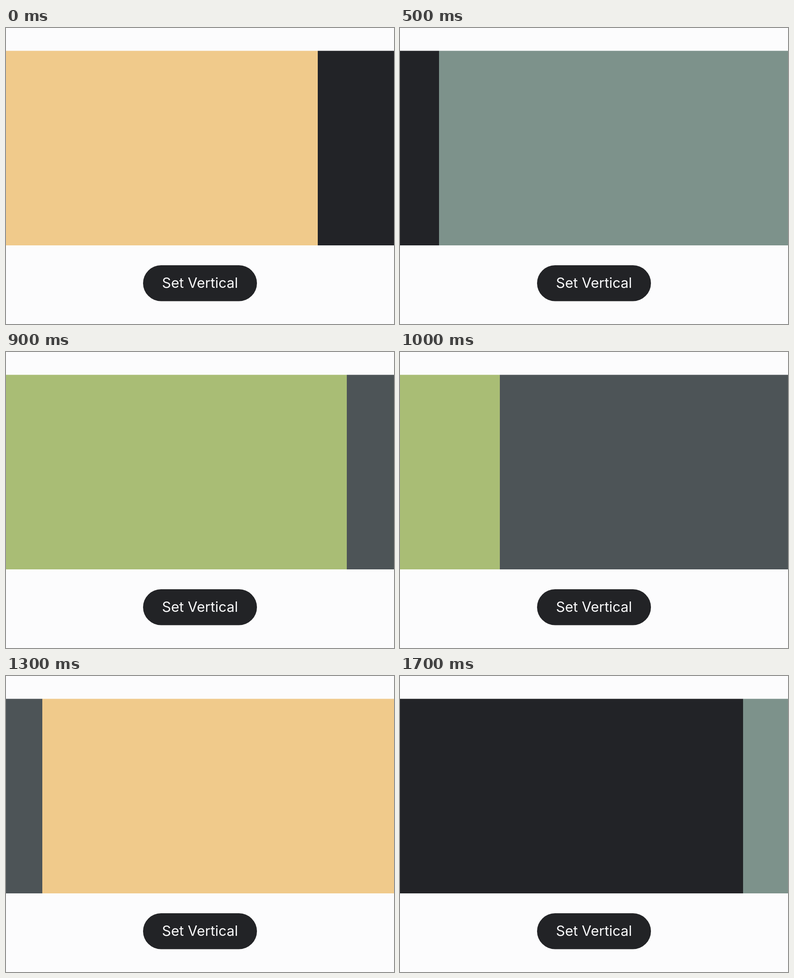
An HTML page for the animation above (1800 ms loop, 855 by 655 pixels).

```html
<!DOCTYPE html>
<html lang="en">
<head>
<meta charset="utf-8">
<title>Carousel</title>
<style>
  html, body { margin: 0; width: 100%; height: 100%; overflow: hidden; background: #fcfcfd; }
  svg { display: block; width: 855px; height: 655px; }
  text { font: 400 31px Inter, "Open Sans", sans-serif; fill: #fafafb; }
</style>
</head>
<body>
<svg viewBox="0 0 855 655">
  <rect width="855" height="655" fill="#fcfcfd"/>
  <g id="pages"></g>
  <rect x="302" y="525" width="251" height="79.5" rx="39.75" fill="#222326"/>
  <text x="427.5" y="575" text-anchor="middle">Set Vertical</text>
</svg>
<script>
const WIDTH = 855, LOOP = 1800, STEP = 100;
const colors = ['#f0ca8b', '#222327', '#7d928b', '#a9bd75', '#4d5457'];

// One swipe per page: start time and duration in ms
const swipes = [
  [-114.6, 392], [317.25, 230], [579.77, 230], [847.9, 230],
  [1115.6, 230], [1381.14, 230], [1649.16, 230]
];

const group = document.getElementById('pages');
const makePage = () => {
  const rect = document.createElementNS('http://www.w3.org/2000/svg', 'rect');
  rect.setAttribute('y', 50.5);
  rect.setAttribute('width', WIDTH);
  rect.setAttribute('height', 430.5);
  return group.appendChild(rect);
};
const pages = [makePage(), makePage()];

const clamp = v => Math.min(1, Math.max(0, v));
const ease = u => Math.sin(Math.PI / 2 * clamp(u)) ** 2;
const scrollAt = t => swipes.reduce((sum, [start, dur]) => sum + ease((t - start) / dur), 0);

function draw(time) {
  const t = Math.floor((time % LOOP) / STEP) * STEP;
  const pos = scrollAt(t), first = Math.floor(pos);
  const shift = Math.round((pos - first) * WIDTH);
  pages.forEach((page, i) => {
    page.setAttribute('x', i * WIDTH - shift);
    page.setAttribute('fill', colors[(first + i) % colors.length]);
  });
}

const begin = performance.now();
function tick() {
  draw(performance.now() - begin);
  requestAnimationFrame(tick);
}
tick();
</script>
</body>
</html>
```
